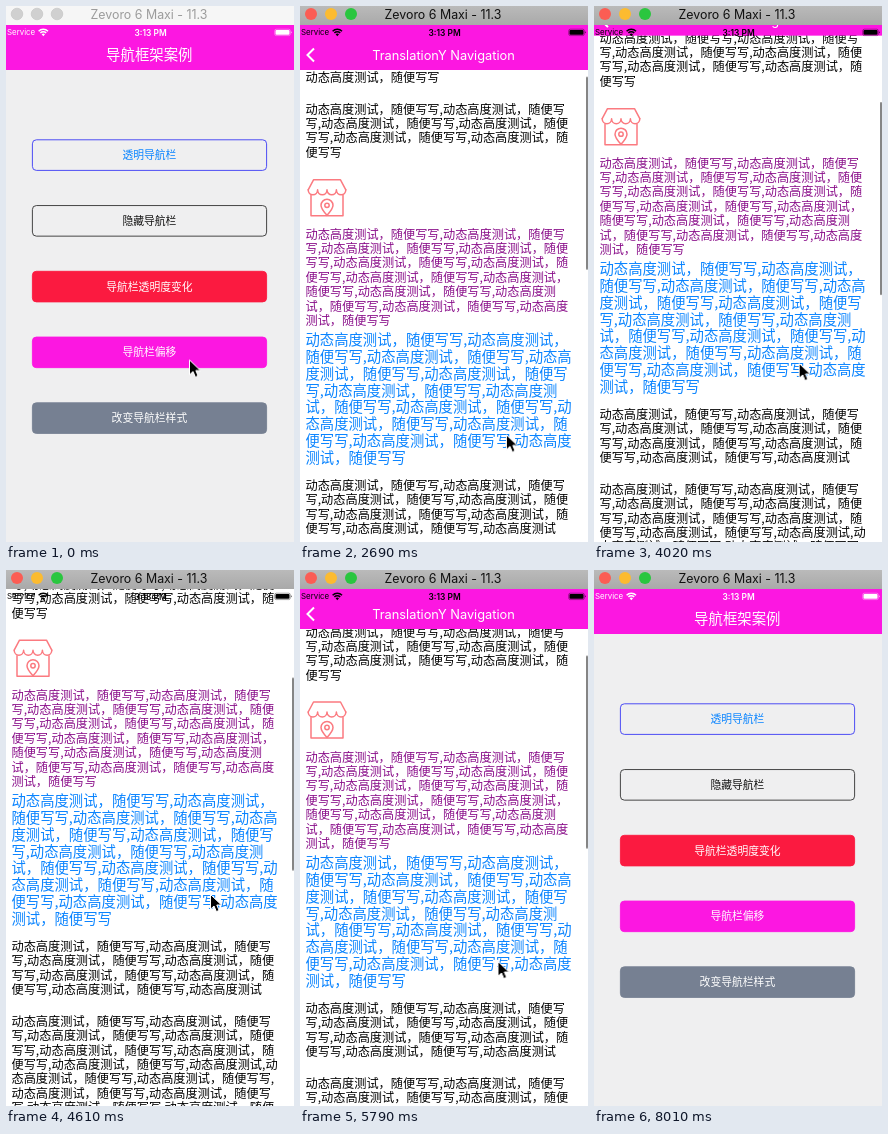
Animation, 288 px wide and 536 px high, one loop 8460 ms. Source, as an HTML page:

```html
<!DOCTYPE html>
<html lang="zh-CN">
<head>
<meta charset="utf-8">
<title>导航框架案例</title>
<style>
@property --s { syntax: '<length>'; inherits: true; initial-value: 0px; }  /* scroll distance */
@property --p { syntax: '<number>'; inherits: true; initial-value: 0; }    /* 0 list page, 1 detail page */

:root {
  --pink: #fc17e1;
  --loop: 8460ms infinite;
  animation: scroll var(--loop), push var(--loop);
}
html, body { margin: 0; width: 100%; height: 100%; overflow: hidden; }
body { position: relative; background: #fff; font-family: "Noto Sans CJK SC", "Noto Sans CJK", sans-serif; }
svg { position: absolute; left: 0; top: 0; overflow: visible; }
.layer { position: absolute; left: 0; top: 0; width: 288px; height: 536px; overflow: hidden; }
.latin { font-family: Inter, Roboto, sans-serif; }

/* pages */
#list { background: #efeff0; transform: translateX(calc(var(--p) * -86px)); }
#list::after { content: ""; position: absolute; inset: 0; background: #000; opacity: calc(var(--p) * .1); }
#list text { font-size: 10.8px; text-anchor: middle; }
#detail { background: #fff; transform: translateX(calc((1 - var(--p)) * 288px)); }
#body { position: absolute; inset: 0; transform: translateY(calc(-1 * var(--s))); }
#body p {
  position: absolute; left: 5.5px; width: 268px; margin: 0;
  font-size: 12.2px; line-height: 14.4px; text-spacing-trim: space-all;
}
#body .purple { color: #8a0f8a; }
#body .blue { color: #0a84ff; font-size: 14.35px; line-height: 16.86px; }
#thumb {
  position: absolute; left: 286px; top: 67.5px; width: 2px; height: 193.5px; border-radius: 1px;
  background: #858585; opacity: 0;
  transform: translateY(calc(var(--s) * .356));
  animation: thumb var(--loop);
}

/* navigation bar */
#nav {
  position: absolute; left: 0; top: 19px; width: 288px; height: 45.3px; overflow: hidden;
  background: var(--pink);
  transform: translateY(clamp(-46px, 44.5px - var(--s), 0px));
}
#nav text { fill: #fff; text-anchor: middle; }
#home { opacity: calc(1 - var(--p)); transform: translateX(calc(var(--p) * -110px)); }
#sub { opacity: var(--p); transform: translateX(calc((1 - var(--p)) * 130px)); }
#back { opacity: var(--p); }

#status {
  --c: calc(255 * (1 - var(--p)));
  color: rgb(var(--c) var(--c) var(--c));
}

/* window title bar */
.bar { position: absolute; left: 0; top: 0; width: 288px; height: 19px; }
.bar text { font-size: 12.4px; text-anchor: middle; }
.idle { background: #f6f6f6; }
.live { background: linear-gradient(#bababa, #a9a9a9); opacity: 0; animation: focus var(--loop); }

#cursor { animation: cursor var(--loop); }

@keyframes focus {
  0% { opacity: 0; animation-timing-function: step-end; }
  12.41%, 100% { opacity: 1; }
}
@keyframes push {
  0% { --p: 0; animation-timing-function: step-end; }
  15.95% { --p: .3; animation-timing-function: step-end; }
  17.72% { --p: .92; animation-timing-function: step-end; }
  19.5% { --p: .9965; animation-timing-function: step-end; }
  21.27% { --p: 1; animation-timing-function: step-end; }
  87.7% { --p: .7; animation-timing-function: step-end; }
  89.47% { --p: .08; animation-timing-function: step-end; }
  91.25% { --p: .0035; animation-timing-function: step-end; }
  92.9%, 100% { --p: 0; }
}
@keyframes scroll {
  0% { --s: 0px; }
  30.04% { --s: 0px; animation-timing-function: steps(5); }
  38.76% { --s: 38.3px; animation-timing-function: steps(9); }
  54.48% { --s: 111.3px; animation-timing-function: steps(1); }
  56.26% { --s: 113px; animation-timing-function: steps(7); }
  68.43% { --s: 49.5px; animation-timing-function: steps(5); }
  77.18%, 100% { --s: 0px; }
}
@keyframes thumb {
  0% { opacity: 0; animation-timing-function: step-end; }
  31.79% { opacity: 1; animation-timing-function: step-end; }
  78.9% { opacity: .5; animation-timing-function: step-end; }
  80.6%, 100% { opacity: 0; }
}
@keyframes cursor {
  0% { transform: translate(183px, 353.5px); }
  14.2% { transform: translate(183px, 353.5px); animation-timing-function: steps(3); }
  19.5% { transform: translate(203px, 388px); animation-timing-function: steps(3); }
  24.82% { transform: translate(206px, 436px); }
  30.04% { transform: translate(206px, 436px); animation-timing-function: steps(5); }
  38.76% { transform: translate(205.5px, 398px); animation-timing-function: steps(9); }
  54.48% { transform: translate(204px, 324px); animation-timing-function: steps(1); }
  56.26% { transform: translate(204px, 322px); animation-timing-function: steps(7); }
  68.43% { transform: translate(197.5px, 391px); animation-timing-function: steps(5); }
  77.18% { transform: translate(196px, 440px); animation-timing-function: steps(4); }
  84.15% { transform: translate(26.5px, 53px); animation-timing-function: steps(1); }
  85.93% { transform: translate(9px, 51.5px); }
  89.47% { transform: translate(9px, 51.5px); animation-timing-function: steps(3); }
  94.67%, 100% { transform: translate(-20px, 51.5px); }
}
</style>
</head>
<body>
<div class="layer">
  <div class="layer" id="list"><svg id="buttons" width="288" height="536"></svg></div>

  <div class="layer" id="detail">
    <div id="body">
      <svg width="60" height="230" fill="none" stroke="#fb7a80" stroke-width="1.5" stroke-linejoin="round" stroke-linecap="round">
        <path d="M8.2 191.5L13.5 181.5H40.5L45.8 191.5"/>
        <path d="M8.2 191.5a4.7 5 0 0 0 9.4 0a4.7 5 0 0 0 9.4 0a4.7 5 0 0 0 9.4 0a4.7 5 0 0 0 9.4 0"/>
        <path d="M11 197V217.5H43V197"/>
        <path d="M27 217c-4-4.300-6-7-6-10a6 6 0 0 1 12 0c0 3-2 5.700-6 10z"/>
        <circle cx="27" cy="207" r="2.200"/>
      </svg>
    </div>
    <div id="thumb"></div>
  </div>

  <div id="nav">
    <svg width="288" height="45">
      <text id="home" x="143.300" y="34.700" font-size="14.400">导航框架案例</text>
      <text id="sub" class="latin" x="143.500" y="34.600" font-size="12.800">TranslationY Navigation</text>
      <path id="back" d="M14 23.500L7.500 30L14 36.500" fill="none" stroke="#fff" stroke-width="2"/>
    </svg>
  </div>

  <svg id="status" class="latin" width="288" height="40" fill="currentColor">
    <text x="1" y="29.400" font-size="7.900">Service</text>
    <g fill="none" stroke="currentColor" stroke-width="1.500">
      <path d="M32.600 25.200a6.600 6.600 0 0 1 9.400 0M34.400 27.100a4 4 0 0 1 5.800 0"/>
    </g>
    <path d="M37.300 30.200l-1.700-1.900a2.400 2.400 0 0 1 3.400 0z"/>
    <text x="144.600" y="29.500" font-size="8.400" font-weight="600" text-anchor="middle">3:13 PM</text>
    <rect x="268.700" y="23.200" width="15.600" height="6.400" rx="1.600" fill="none" stroke="currentColor" stroke-width=".600" opacity=".6"/>
    <rect x="269.500" y="24" width="14" height="4.800" rx="1"/>
    <path d="M285.100 25.300q1.400 1.100 0 2.200z"/>
  </svg>

  <div class="bar idle">
    <svg class="latin" width="288" height="19">
      <g fill="#d0d0d0" stroke="#c2c2c2" stroke-width=".600">
        <circle cx="11" cy="8" r="5.800"/><circle cx="31" cy="8" r="5.800"/><circle cx="51" cy="8" r="5.800"/>
      </g>
      <text x="143" y="12.600" fill="#9c9c9c">Zevoro 6 Maxi - 11.3</text>
    </svg>
  </div>
  <div class="bar live">
    <svg class="latin" width="288" height="19">
      <circle cx="11" cy="8" r="6" fill="#fb5d54"/>
      <circle cx="31" cy="8" r="6" fill="#fcbb30"/>
      <circle cx="51" cy="8" r="6" fill="#2ac63f"/>
      <text x="143" y="12.600" fill="#111">Zevoro 6 Maxi - 11.3</text>
    </svg>
  </div>

  <svg id="cursor" width="14" height="20">
    <path d="M.500 .500V15.200L4 12L6.400 17.600L9.100 16.400L6.800 11H11.500z" fill="#000" stroke="#fff" stroke-width="1"/>
  </svg>
</div>

<script>
// label, fill, border, text colour
const buttons = [
  ['透明导航栏', 'none', '#3a3af5', '#0a84ff'],
  ['隐藏导航栏', 'none', '#333', '#111'],
  ['导航栏透明度变化', '#fb1a40', '#fb1a40', '#fff'],
  ['导航栏偏移', '#fc17e1', '#fc17e1', '#fff'],
  ['改变导航栏样式', '#768092', '#768092', '#fff']
];
document.getElementById('buttons').innerHTML = buttons.map(([label, fill, line, ink], i) => {
  const y = 133.8 + i * 65.75;
  return `<rect x="26.400" y="${y}" width="234.200" height="30.600" rx="4" fill="${fill}" stroke="${line}" stroke-width=".900"/>
    <text x="143.400" y="${y + 19.3}" fill="${ink}">${label}</text>`;
}).join('');

const phrase = '动态高度测试，随便写写';
const repeat = n => Array(n).fill(phrase).join(',');
const short = repeat(8).slice(0, -5);
const body = document.getElementById('body');

function para(top, text, style = '') {
  const p = document.createElement('p');
  p.className = style;
  p.style.top = top + 'px';
  p.textContent = text;
  body.append(p);
}
para(72.2, phrase);
para(103.6, repeat(6));
para(228.6, repeat(12), 'purple');
para(333, repeat(12), 'blue');
para(479.7, short);
para(554.7, short + ',' + short);
</script>
</body>
</html>
```
